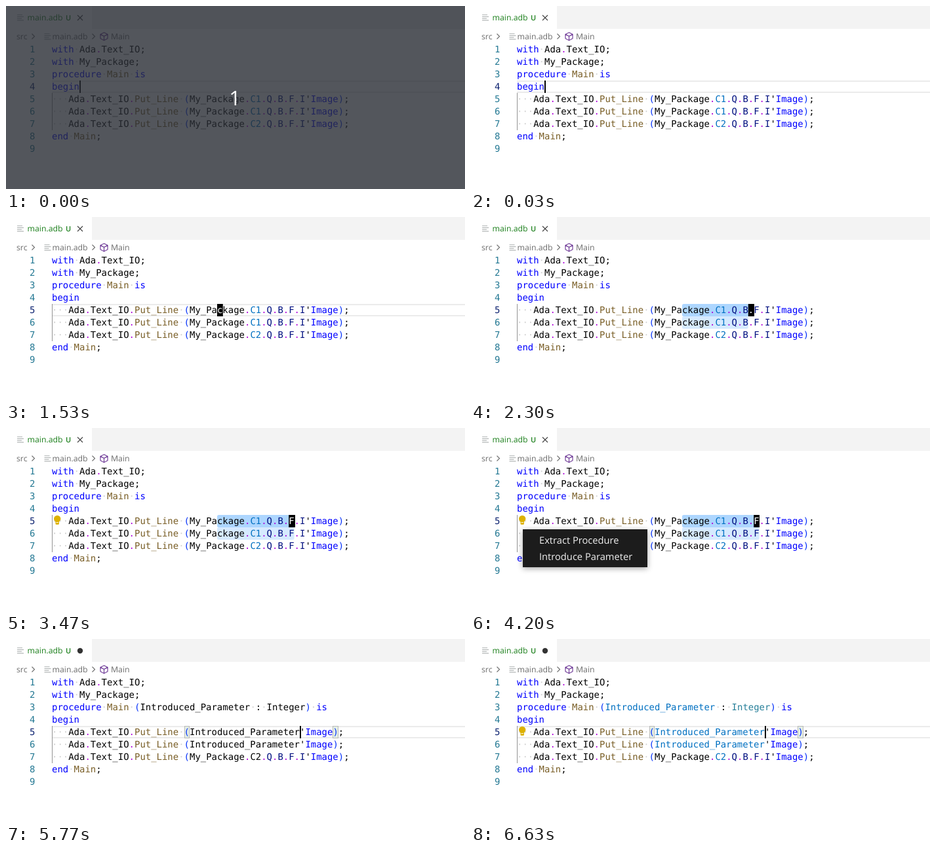
Recreate the animation shown at these times as an HTML page. Size 700x280 px, loop 8 s.

```html
<!DOCTYPE html>
<html lang="en">
<head>
<meta charset="utf-8">
<title>Introduce Parameter</title>
<style>
  html, body { margin: 0; width: 100%; height: 100%; overflow: hidden; background: #fff; }
  svg { display: block; width: 700px; height: 280px; text-rendering: geometricPrecision; }
  text { white-space: pre; }
  .mono { font: 13.954px "DejaVu Sans Mono", monospace; }
  .ui { font: 12.3px "Open Sans", sans-serif; fill: #6c6c6c; }
  .item { font-size: 14.7px; fill: #f0f0f0; }
  .line { fill: none; stroke: #6c6c6c; stroke-width: 1.1; }
  .kw { fill: #0000ff; }
  .fn { fill: #795e26; }
  .prop { fill: #0070c1; }
  .var { fill: #001080; }
  .type { fill: #267f99; }
  .par { fill: #0431fa; }
  .dot { fill: #af00db; }
  .ws { fill: #d2d2d2; }
  .raw .prop, .raw .type { fill: #000; }
  .num { fill: #237893; text-anchor: end; }
  .num.active { fill: #0b216f; }
  .match { fill: #d6eaff; }
  .bracket { fill: #e5f0e5; stroke: #b9b9b9; }
  .shadow { filter: drop-shadow(0 2px 4px rgba(0, 0, 0, .36)); }
</style>
</head>
<body>
<svg viewBox="0 0 700 280">
  <rect width="700" height="280" fill="#fff"/>

  <!-- tab bar -->
  <rect x="131" width="569" height="35" fill="#f3f3f3"/>
  <path id="file" d="M17 13.5h8M17 16.3h10M17 19.1h7M17 21.9h10" stroke="#b4b8b8" stroke-width="1.2"/>
  <text class="ui" x="32.5" y="22" style="fill:#1b7f1b">main.adb</text>
  <text class="ui" x="91" y="22" style="fill:#1b7f1b;font-size:11px;font-weight:600">U</text>
  <path data-on="0 5700" class="line" d="M109 14l8 8m0-8l-8 8" style="stroke:#424242"/>
  <circle data-on="5700 8000" cx="113" cy="18" r="4.2" fill="#333"/>

  <!-- breadcrumbs -->
  <text class="ui" x="16" y="50.5">src</text>
  <use href="#file" x="41.5" y="29"/>
  <text class="ui" x="70.5" y="50.5">main.adb</text>
  <text class="ui" x="160" y="50.5">Main</text>
  <path class="line" d="M39.500 42.500l4 4-4 4M131.500 42.500l4 4-4 4"/>
  <path class="line" d="M149.500 40.500l5.500 2.800v6.400l-5.500 3-5.500-3v-6.400zM144 43.300l5.500 3 5.500-3M149.500 46.300v6.400" style="stroke:#652d90"/>

  <!-- editor -->
  <path id="current" d="M70 1H700M70 18H700" stroke="#ebebeb" stroke-width="2"/>
  <rect id="sel" x="322" y="133" height="19" rx="2.5" fill="#add6ff"/>
  <g id="matches"></g>
  <rect data-on="970 1530" x="280" y="133" width="84" height="18" fill="#add6ff" opacity=".3"/>
  <g data-on="5770 8000" class="bracket">
    <rect x="272.500" y="133.500" width="7" height="18"/>
    <rect x="498.500" y="133.500" width="8" height="18"/>
  </g>
  <path d="M70.500 133v57" stroke="#939393"/>
  <g id="nums" class="mono"></g>
  <g id="before" class="mono" data-on="0 5700"></g>
  <g id="after" class="mono" data-on="5700 8000"></g>
  <g id="block" class="mono" data-on="1530 5700">
    <rect y="133" width="8.8" height="19"/>
    <text y="147" fill="#fff"></text>
  </g>
  <rect id="caret" height="19"/>
  <g data-on="2730 5700 5970 8000">
    <path d="M75.500 144.200c0-1.800-2.500-2.500-2.500-5.200a5.200 5.200 0 0 1 10.400 0c0 2.700-2.500 3.400-2.500 5.200v2.300q0 1.300-1.300 1.300h-2.800q-1.300 0-1.300-1.300z" fill="#ddb100"/>
    <path d="M76.600 144.500h3.200" stroke="#fff"/>
  </g>
  <path id="folds" class="line" d="M54.500 65.500l4 4 4-4m-8 38l4 4 4-4"/>

  <!-- hover card -->
  <g id="hover">
    <path d="M280.500 76.500h177v56h-177zM281 104.500h176" fill="#f3f3f3" stroke="#c8c8c8"/>
    <text class="mono" x="289" y="95"><tspan class="kw">package</tspan> My_Package</text>
    <text class="ui" x="289" y="123" style="font-size:13px;fill:#444">at my_package.ads (1:9)</text>
  </g>

  <!-- code action menu -->
  <g id="menu">
    <rect class="shadow" x="79" y="155" width="190" height="58" fill="#1c1c1c"/>
    <rect data-on="4870 5130" x="80" y="159" width="188" height="25" fill="#3c3c3c"/>
    <rect data-on="5130 5630" x="80" y="184" width="188" height="25" fill="#3c3c3c"/>
    <text class="ui item" x="104" y="177">Extract Procedure</text>
    <text class="ui item" x="104" y="202">Introduce Parameter</text>
  </g>

  <!-- notification -->
  <g id="toast">
    <rect class="shadow" x="139" y="185" width="580" height="120" fill="#f3f3f3"/>
    <circle cx="160" cy="209" r="6.500" fill="none" stroke="#1a85ff" stroke-width="1.200"/>
    <path d="M160 208v4.500m0-7.500v1.500" stroke="#1a85ff" stroke-width="1.400"/>
    <text class="ui" x="176" y="213.500" style="font-size:13px">Introduce Parameter</text>
  </g>

  <!-- countdown -->
  <g data-on="0 30">
    <rect width="700" height="280" fill="rgb(40,44,52)" opacity=".8"/>
    <text class="ui" x="349" y="152" text-anchor="middle" style="font-size:31px;fill:#fff">1</text>
  </g>
</svg>
<script>
const LOOP = 8000, CHAR = 8.4, LEFT = 70, TOP = 57, ROW = 19;
const START = 30;   // column where the selection begins
const $ = id => document.getElementById(id);
const colX = c => LEFT + c * CHAR;
const rowY = r => TOP + r * ROW;

const kinds = {
  kw: ['with', 'procedure', 'is', 'begin', 'end', 'Image'],
  fn: ['Main', 'Put_Line'],
  prop: ['C1', 'C2', 'Introduced_Parameter'],
  var: ['Q', 'B', 'F', 'I'],
  type: ['Integer'],
  par: ['(', ')'],
  dot: ['.'],
  ws: [' ']
};
const kindOf = {};
for (const k in kinds) for (const word of kinds[k]) kindOf[word] = k;

const put = arg => `   Ada.Text_IO.Put_Line (${arg}'Image);`;
const field = c => `My_Package.${c}.Q.B.F.I`;
const source = (head, first) => [
  'with Ada.Text_IO;', 'with My_Package;', `procedure Main ${head}is`, 'begin',
  put(first), put(first), put(field('C2')), 'end Main;', ''
];
const lines = source('', field('C1'));
const edited = source('(Introduced_Parameter : Integer) ', 'Introduced_Parameter');

function add(parent, tag, attrs, content = '') {
  const el = document.createElementNS('http://www.w3.org/2000/svg', tag);
  for (const k in attrs) el.setAttribute(k, attrs[k]);
  el.textContent = content;
  return parent.appendChild(el);
}

function writeCode(group, code) {
  code.forEach((line, r) => {
    for (const m of line.matchAll(/\w+|./g)) {
      add(group, 'text', { x: colX(m.index), y: rowY(r) + 14, class: kindOf[m[0]] || '' },
        m[0] === ' ' ? '·' : m[0]);
    }
  });
}
writeCode($('before'), lines);
writeCode($('after'), edited);

const nums = lines.map((_, r) => add($('nums'), 'text', { x: 44.4, y: rowY(r) + 14, class: 'num' }, r + 1));
const matches = [1, 5, 6].map(r => ({
  line: lines[r],
  el: add($('matches'), 'rect', { y: rowY(r), height: ROW, rx: 2.5, class: 'match' })
}));

const within = (t, ranges) => ranges.some((a, i) => i % 2 === 0 && t >= a && t < ranges[i + 1]);
const timed = [...document.querySelectorAll('[data-on]')]
  .map(el => ({ el, ranges: el.dataset.on.split(' ').map(Number) }));
const show = (el, on) => { el.style.display = on ? '' : 'none'; };
const ramp = (t, a, b) => Math.min(1, Math.max(0, (t - a) / (b - a)));
const fade = (el, v) => { show(el, v > 0); el.style.opacity = v; };
const set = (el, attrs) => { for (const k in attrs) el.setAttribute(k, attrs[k]); };

// Column of the block cursor while dragging the selection
function headCol(t) {
  if (t < 1570) return START;
  return t < 2470 ? Math.min(42, 31 + Math.floor((t - 1570) / 66.3)) : 43;
}

function draw(t) {
  for (const { el, ranges } of timed) show(el, within(t, ranges));

  const row = t < 1530 ? 3 : 4;
  nums.forEach((el, r) => el.classList.toggle('active', r === row));
  show($('current'), t < 1570 || t >= 5700);
  set($('current'), { transform: `translate(0 ${rowY(row)})` });

  const head = headCol(t), selecting = t >= 1570 && t < 5700;
  const [box, glyph] = $('block').children;
  set(box, { x: colX(head) });
  set(glyph, { x: colX(head) });
  glyph.textContent = lines[4][head];
  show($('sel'), selecting);
  set($('sel'), { width: (head + 1 - START) * CHAR });

  // Other occurrences follow the selection a moment later
  const picked = lines[4].slice(START, headCol(t - 30) + 1);
  for (const { line, el } of matches) {
    const at = line.indexOf(picked);
    show(el, selecting && picked.length > 1 && at >= 0);
    set(el, { x: colX(Math.max(at, 0)), width: picked.length * CHAR });
  }

  show($('caret'), within(t, [0, 1530, 1570, 2970, 3470, 3970, 4470, 4970, 5430, LOOP]));
  set($('caret'), {
    x: t < 1530 ? 112 : t < 5700 ? Math.round(colX(head + 1)) : 448,
    y: rowY(row),
    width: selecting ? 1 : 2
  });
  $('after').classList.toggle('raw', t < 5970);

  fade($('hover'), t < 1530 ? ramp(t, 945, 1070) : 0);
  fade($('folds'), t < 3700 ? ramp(t, 3470, 3970) : 0.46 * (1 - ramp(t, 3700, 4200)));
  fade($('menu'), t < 5630 ? ramp(t, 3900, 3985) : 0);
  fade($('toast'), t < 6630 ? ramp(t, 5950, 6070) : 0);
}

const origin = performance.now();
function tick() {
  draw((performance.now() - origin) % LOOP);
  requestAnimationFrame(tick);
}
tick();
</script>
</body>
</html>
```
